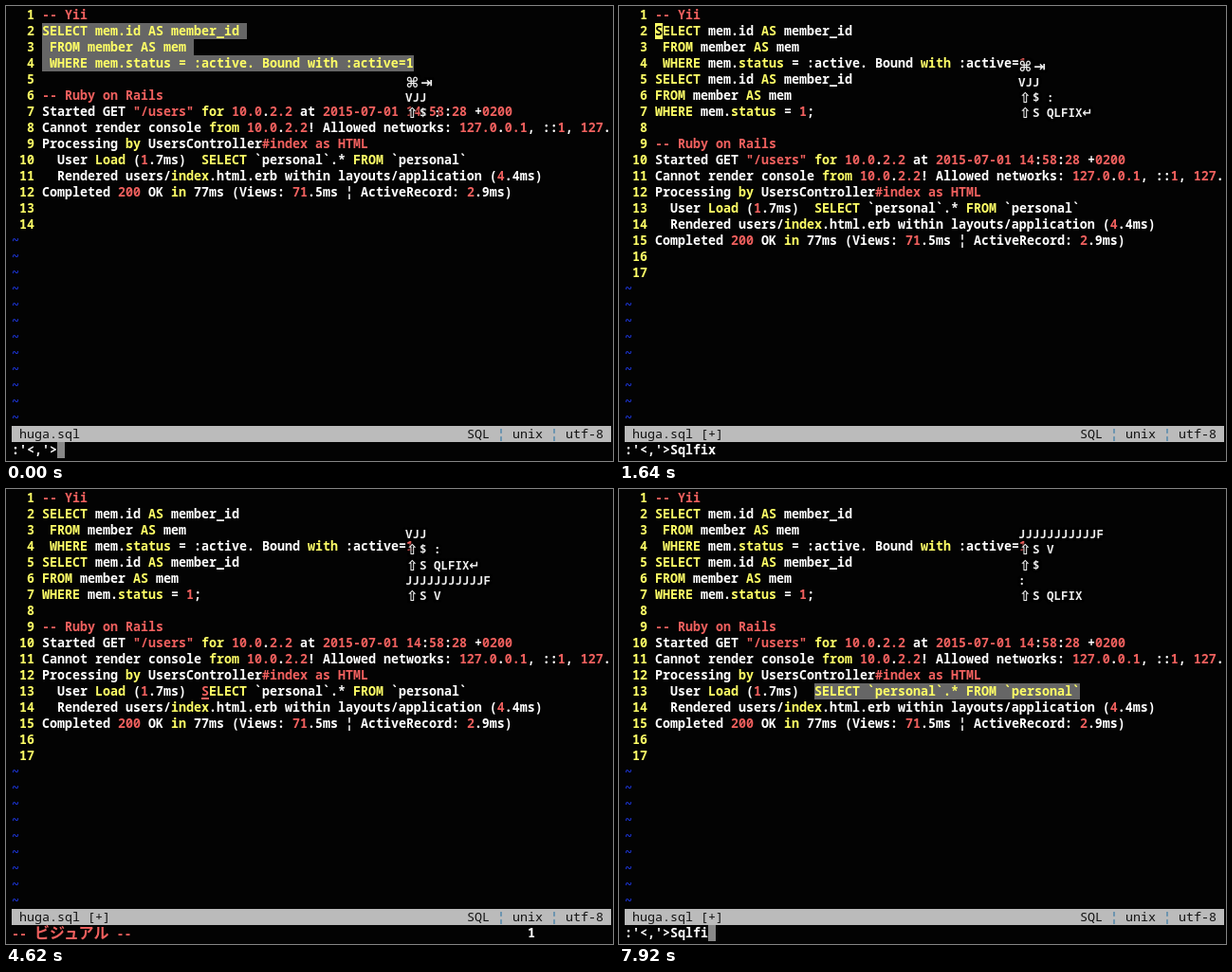
An HTML page for the animation above (8000 ms loop, 640 by 480 pixels).

```html
<!DOCTYPE html>
<html lang="en">
<head>
<meta charset="utf-8">
<title>Vim session</title>
<style>
  html, body { margin: 0; width: 100%; height: 100%; overflow: hidden; background: #030303; }
  #screen { position: absolute; left: 0; top: 0; width: 640px; height: 480px; overflow: hidden; }
  .cell {
    position: absolute; height: 17px; overflow: hidden; white-space: pre; color: #fff;
    font: 600 13.333px/16px "Noto Sans Mono", "Noto Sans CJK JP", "Noto Sans CJK", monospace;
  }
  .cell.yellow, .yellow { color: #ffff66; }
  .cell.red, .red { color: #f0605e; }
  .cell.tilde { color: #1c35d6; }
  .cell.select { background: #666; color: #ffff66; }
  .cell.status { background: #bbb; color: #111; font-weight: 400; }
  .status i { font-style: normal; color: #1c6ea4; }
  .cell.block { background: #fff; color: #000; }
  .cell.block.yellow { background: #ffff66; }
  .cell.block.red { background: #f0605e; }
  .cell.under { background: #030303; color: #f0605e; box-shadow: inset 0 -2px #f0605e; }
  .cell.caret { background: #888; }
  .wide { font-size: 16px; }
  .keys {
    position: absolute; left: 421px; height: 16px; white-space: pre; color: #eee;
    font: 700 12.5px/16px "Noto Sans Mono", monospace;
    text-shadow: 0 0 2px #000, 0 0 2px #000, 0 0 3px #000, 0 0 3px #000;
  }
  .keys b {
    display: inline-block; width: 15px; height: 16px; vertical-align: top; text-align: center;
    font: 700 15px/16px "DejaVu Sans", sans-serif;
  }
  .keys b.enter { width: 11px; font-size: 13px; }
</style>
</head>
<body>
<div id="screen"></div>
<script>
const LOOP = 8000, COL = 8, ROW = 17, LEFT = 6, TOP = 1, GUTTER = 4;
const screenEl = document.getElementById('screen');

const query = 'SELECT `personal`.* FROM `personal`';
const opening = [
  '-- Yii',
  'SELECT mem.id AS member_id',
  ' FROM member AS mem',
  ' WHERE mem.status = :active. Bound with :active=1'
];
const fixed = ['SELECT mem.id AS member_id', 'FROM member AS mem', 'WHERE mem.status = 1;'];
const rest = [
  '',
  '-- Ruby on Rails',
  'Started GET "/users" for 10.0.2.2 at 2015-07-01 14:58:28 +0200',
  'Cannot render console from 10.0.2.2! Allowed networks: 127.0.0.1, ::1, 127.',
  'Processing by UsersController#index as HTML',
  '  User Load (1.7ms)  ' + query,
  '  Rendered users/index.html.erb within layouts/application (4.4ms)',
  'Completed 200 OK in 77ms (Views: 71.5ms ¦ ActiveRecord: 2.9ms)',
  '', ''
];
const before = [...opening, ...rest];
const after = [...opening, ...fixed, ...rest];

const range = ":'<,'>", visual = '-- ビジュアル --';
const typing = (word) => ({ cmd: range + word, caret: true });
const cursorAt = (row, tone = '') =>
  ({ cursor: { col: GUTTER, row, char: after[row - 1][0] || ' ', style: 'block ' + tone } });
const queryCol = GUTTER + 21, queryRow = 13;
const onQuery = (style) => ({ cursor: { col: queryCol, row: queryRow, char: 'S', style } });
const selectQuery = [[queryCol, queryRow, query, query.length]];

// Each step: start time, keys added to the key display, changed state.
const steps = [
  [0, '⌘⇥\nVJJ\n⇧$ :', {
    lines: before, file: 'huga.sql', count: '', cursor: null, ...typing(''),
    selection: [2, 3, 4].map(row => {
      const text = before[row - 1];
      return [GUTTER, row, text, text.length + (row < 4 ? 1 : 0)];
    })
  }],
  [300, '\n⇧S ', typing('S')],
  [750, 'Q', typing('Sq')],
  [900, 'L', typing('Sql')],
  [1050, 'F', typing('Sqlf')],
  [1200, 'I', typing('Sqlfi')],
  [1350, 'X', {}],
  [1490, '', typing('Sqlfix')],
  [1640, '↵', { lines: after, file: 'huga.sql [+]', caret: false, selection: [], ...cursorAt(2, 'yellow') }],
  [2240, '\nJ', cursorAt(3)],
  [2390, 'JJ', cursorAt(5, 'yellow')],
  [2540, 'JJ', cursorAt(7, 'yellow')],
  [2690, 'JJ', cursorAt(9, 'red')],
  [2830, 'JJ', cursorAt(11)],
  [3130, 'J', cursorAt(12)],
  [3280, 'J', cursorAt(13)],
  [3580, 'F', { cursor: null }],
  [4020, '\n⇧S ', onQuery('block yellow')],
  [4620, 'V', { cmd: visual, count: '1', ...onQuery('under') }],
  [5070, '\n⇧$', {
    count: '36', selection: selectQuery,
    cursor: { col: queryCol + query.length, row: queryRow, char: ' ', style: 'block' }
  }],
  [6120, '\n:', {}],
  [6270, '', { count: '', cursor: null, ...typing('') }],
  [6720, '\n⇧S ', typing('S')],
  [7020, 'Q', typing('Sq')],
  [7170, 'L', typing('Sql')],
  [7320, 'F', typing('Sqlf')],
  [7470, 'I', {}],
  [7620, '', typing('Sqlfi')],
  [7920, 'X', {}]
];

let current = { keys: '' };
const states = steps.map(([time, keys, change]) =>
  current = { ...current, ...change, time, keys: current.keys + keys });

const escapeHtml = (text) => text.replace(/&/g, '&amp;').replace(/</g, '&lt;');

function highlight(text) {
  const tokens = /(^--.*|#.*|"[^"]*"|-?\b(?=\d)\d*\.?\d\b)|\b(SELECT|FROM|WHERE|AS|Load|status|index|for|from|by|in|with)\b/g;
  return text.replace(tokens, (token, red) => `<span class="${red ? 'red' : 'yellow'}">${token}</span>`);
}

function cell(col, row, html, style = '', cols = 80 - col) {
  const x = LEFT + col * COL, y = TOP + (row - 1) * ROW;
  return `<div class="cell ${style}" style="left:${x}px;top:${y}px;width:${cols * COL}px">${html}</div>`;
}

function keyDisplay(keys) {
  return keys.split('\n').slice(-5).reverse().map((line, i) => {
    const html = line.replace(/[⌘⇥⇧]/g, '<b>$&</b>').replace('↵', '<b class="enter">↵</b>');
    return `<div class="keys" style="top:${105 - i * 16.25}px">${html}</div>`;
  }).join('');
}

function render({ lines, file, selection, cursor, cmd, caret, count, keys }) {
  let html = '';
  for (let row = 1; row <= 26; row++) {
    if (row > lines.length) {
      html += cell(0, row, '~', 'tilde');
    } else {
      html += cell(0, row, String(row).padStart(3), 'yellow', 3);
      html += cell(GUTTER, row, highlight(lines[row - 1]), '', 75);
    }
  }
  for (const [col, row, text, cols] of selection) html += cell(col, row, text, 'select', cols);
  if (cursor) html += cell(cursor.col, cursor.row, cursor.char, cursor.style, 1);

  html += cell(0, 27, ' ' + file, 'status', 79);
  html += cell(60, 27, 'SQL <i>¦</i> unix <i>¦</i> utf-8', 'status', 18);
  const prompt = escapeHtml(cmd).replace(/[ァ-ヴー]+/, '<span class="wide">$&</span>');
  html += cell(0, 28, prompt, cmd === visual ? 'red' : '');
  if (caret) html += cell(cmd.length, 28, ' ', 'caret', 1);
  html += cell(68, 28, count);
  screenEl.innerHTML = html + keyDisplay(keys);
}

let shown = null;
function tick() {
  const time = performance.now() % LOOP;
  const state = states.filter(s => s.time <= time).pop();
  if (state !== shown) render(shown = state);
  requestAnimationFrame(tick);
}
tick();
</script>
</body>
</html>
```
